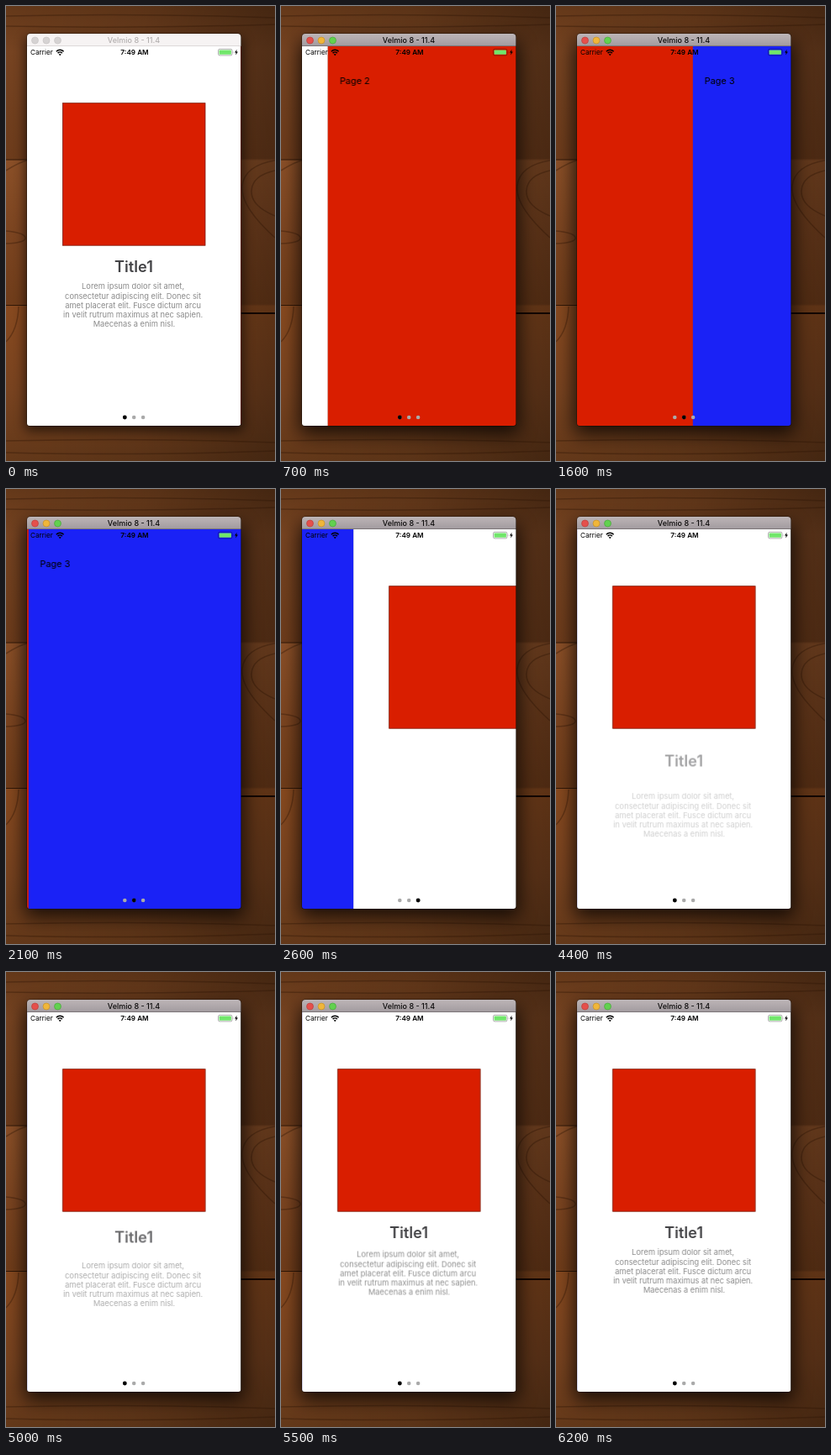
An HTML page for the animation above (6.4 s loop, 320 by 542 pixels).

```html
<!DOCTYPE html>
<html lang="en">
<head>
<meta charset="utf-8">
<title>Onboarding pager</title>
<style>
  html, body { margin: 0; width: 100%; height: 100%; overflow: hidden; background: #4a2912; }
  svg { display: block; width: 320px; height: 542px; font-family: Inter, Roboto, sans-serif; }

  .heading { font-size: 18.2px; font-weight: 600; fill: #444447; text-anchor: middle; }
  .body { font-size: 9.3px; fill: #8a8a8a; text-anchor: middle; }
  .label { font-size: 10.9px; }
  .caption { font-size: 9px; font-weight: 500; text-anchor: middle; }
  .status { font-size: 8.2px; }

  .strip, .rise, .active-dot, .focus, .blur { animation: 6400ms linear infinite; }

  .strip {
    animation-name: swipe;
    animation-timing-function: cubic-bezier(.35, .1, .25, 1);
  }
  @keyframes swipe {
    0%, 2.95% { transform: translateX(0); }
    16.23%, 20.84% { transform: translateX(-254.4px); }
    34.12%, 34.22% { transform: translateX(-508.8px); }
    47.52%, 100% { transform: translateX(-763.2px); }
  }

  .rise.heading { animation-name: rise-heading; }
  @keyframes rise-heading {
    0%, 53.125% { transform: translateY(27px); opacity: 0; }
    84.375%, 100% { transform: none; opacity: 1; }
  }
  .rise.body { animation-name: rise-body; }
  @keyframes rise-body {
    0%, 56.14% { transform: translateY(54px); opacity: 0; }
    87.39%, 100% { transform: none; opacity: 1; }
  }

  .active-dot { animation-name: dot; animation-timing-function: step-end; }
  @keyframes dot {
    0%, 47.6% { transform: translateX(0); }
    16.3% { transform: translateX(10.9px); }
    34.2% { transform: translateX(21.8px); }
  }

  .focus { animation-name: focus; animation-timing-function: step-end; }
  @keyframes focus {
    0% { opacity: 0; }
    1.5%, 100% { opacity: 1; }
  }
  .blur { animation-name: blur; animation-timing-function: step-end; }
  @keyframes blur {
    0% { opacity: 1; }
    1.5%, 100% { opacity: 0; }
  }
  .wide { filter: blur(11px); }
  .tight { filter: blur(7px); }
</style>
</head>
<body>
<svg viewBox="0 0 320 542">
  <defs>
    <linearGradient id="wood" x2="0" y2="1">
      <stop offset="0" stop-color="#643819"/>
      <stop offset=".1" stop-color="#764321"/>
      <stop offset=".335" stop-color="#6c3b1b"/>
      <stop offset=".34" stop-color="#8a4f27"/>
      <stop offset=".5" stop-color="#7b4420"/>
      <stop offset=".655" stop-color="#6f3c1a"/>
      <stop offset=".66" stop-color="#87491f"/>
      <stop offset=".85" stop-color="#77421f"/>
      <stop offset="1" stop-color="#633819"/>
    </linearGradient>
    <linearGradient id="shade">
      <stop offset="0" stop-opacity="0"/>
      <stop offset=".5" stop-opacity=".1"/>
      <stop offset=".85" stop-opacity=".25"/>
      <stop offset="1" stop-opacity=".32"/>
    </linearGradient>
    <linearGradient id="bar" x2="0" y2="1">
      <stop offset="0" stop-color="#bdb5b7"/>
      <stop offset="1" stop-color="#a19a9e"/>
    </linearGradient>
    <clipPath id="window"><path d="M25 37q0-4 4-4h246.400q4 0 4 4v460q0 3-3 3h-248.400q-3 0-3-3z"/></clipPath>
    <g id="card">
      <rect x="25" y="47" width="254.400" height="454" fill="#fff"/>
      <rect x="67.500" y="115.700" width="169.500" height="169.500" fill="#d91e00" stroke="#7a1808" stroke-width=".8"/>
    </g>
    <text id="heading" x="152" y="316.500">Title1</text>
    <text id="body">
      <tspan x="152.400" y="337.300">Lorem ipsum dolor sit amet,</tspan>
      <tspan x="152.400" y="348.500">consectetur adipiscing elit. Donec sit</tspan>
      <tspan x="152.400" y="359.700">amet placerat elit. Fusce dictum arcu</tspan>
      <tspan x="152.400" y="370.900">in velit rutrum maximus at nec sapien.</tspan>
      <tspan x="152.400" y="382.100">Maecenas a enim nisl.</tspan>
    </text>
  </defs>

  <!-- Desktop -->
  <rect width="320" height="542" fill="url(#wood)"/>
  <rect width="320" height="542" fill="url(#shade)"/>
  <g fill="none" stroke="#2a1305" stroke-opacity=".35" stroke-width="1.500">
    <path d="M320 184Q284 190 281 214T320 276M320 196Q293 202 292 220T320 250"/>
    <path d="M0 268Q22 270 23 276T0 283M0 196Q16 186 25 184M0 400Q14 386 15 358"/>
    <path d="M0 12Q150 8 320 14M0 24Q150 27 320 22M0 518Q160 514 320 520M0 532Q150 536 320 530"/>
  </g>
  <path d="M0 183H25M0 356.500H25" stroke="#2e1606"/>
  <path d="M279 366H320" stroke="#120600" stroke-width="2"/>

  <!-- Window shadow -->
  <g class="focus"><rect class="wide" x="22" y="42" width="261" height="468" rx="4" opacity=".75"/></g>
  <g class="blur"><rect class="tight" x="23" y="38" width="259" height="468" rx="4" opacity=".6"/></g>
  <path d="M24.500 37q0-4.500 4.500-4.500h246.400q4.500 0 4.500 4.500v460q0 3.500-3.500 3.500h-248.400q-3.500 0-3.500-3.500z" fill-opacity=".55"/>

  <g clip-path="url(#window)">
    <!-- Pages -->
    <g class="strip">
      <use href="#card"/>
      <use href="#heading" class="heading"/>
      <use href="#body" class="body"/>
      <g transform="translate(254.400)">
        <rect x="25" y="47" width="254.800" height="454" fill="#d91e00"/>
        <text class="label" x="39" y="93">Page 2</text>
      </g>
      <g transform="translate(508.800)">
        <rect x="25" y="47" width="254.800" height="454" fill="#1a22f6"/>
        <text class="label" x="39" y="93">Page 3</text>
      </g>
      <g transform="translate(763.200)">
        <use href="#card"/>
        <use href="#heading" class="rise heading"/>
        <use href="#body" class="rise body"/>
      </g>
    </g>

    <!-- Status bar -->
    <g class="status">
      <text x="29" y="58">Carrier</text>
      <text x="153" y="58" text-anchor="middle" font-weight="600">7:49 AM</text>
      <g fill="none" stroke="#000" stroke-width="1.500">
        <path d="M59.800 54.200a6.200 6.200 0 0 1 8.800 0M61.600 56.100a3.700 3.700 0 0 1 5.200 0"/>
      </g>
      <path d="M64.200 59.200l-1.500-1.600a2.200 2.200 0 0 1 3 0z"/>
      <rect x="252.500" y="51.300" width="16.500" height="7.600" rx="1.800" fill="none" stroke="#000" stroke-opacity=".4" stroke-width=".8"/>
      <path d="M269.900 53.700q1.200 1.400 0 2.800z" fill-opacity=".4"/>
      <rect x="253.600" y="52.400" width="14.300" height="5.400" rx=".9" fill="#71e66b"/>
      <path d="M274.600 51.800l-2.600 3.800h1.700l-.5 2.800 2.700-3.900h-1.700z"/>
    </g>

    <!-- Page dots -->
    <g fill="#aaa">
      <circle cx="141.300" cy="490" r="2.300"/>
      <circle cx="152.200" cy="490" r="2.300"/>
      <circle cx="163.100" cy="490" r="2.300"/>
    </g>
    <circle class="active-dot" cx="141.300" cy="490" r="2.400"/>

    <!-- Title bar -->
    <g class="focus">
      <rect x="25" y="33" width="255" height="15" fill="url(#bar)"/>
      <path d="M25 47.600H280" stroke="#6d6669" stroke-width=".8"/>
      <g stroke-width=".6">
        <circle cx="34.500" cy="41" r="4" fill="#e5504c" stroke="#b83a37"/>
        <circle cx="48" cy="41" r="4" fill="#f0b63a" stroke="#c08a22"/>
        <circle cx="61.500" cy="41" r="4" fill="#62d14f" stroke="#429f36"/>
      </g>
      <text class="caption" x="152" y="44.200" fill="#0c0b0b">Velmio 8 - 11.4</text>
    </g>
    <g class="blur">
      <rect x="25" y="33" width="255" height="15" fill="#f6f3f3"/>
      <path d="M25 47.600H280" stroke="#d4d0d0" stroke-width=".8"/>
      <g fill="#d6d3d3" stroke="#c5c1c1" stroke-width=".6">
        <circle cx="34.500" cy="41" r="4"/>
        <circle cx="48" cy="41" r="4"/>
        <circle cx="61.500" cy="41" r="4"/>
      </g>
      <text class="caption" x="152" y="44.200" fill="#b3afaf">Velmio 8 - 11.4</text>
    </g>
  </g>
</svg>
</body>
</html>
```
